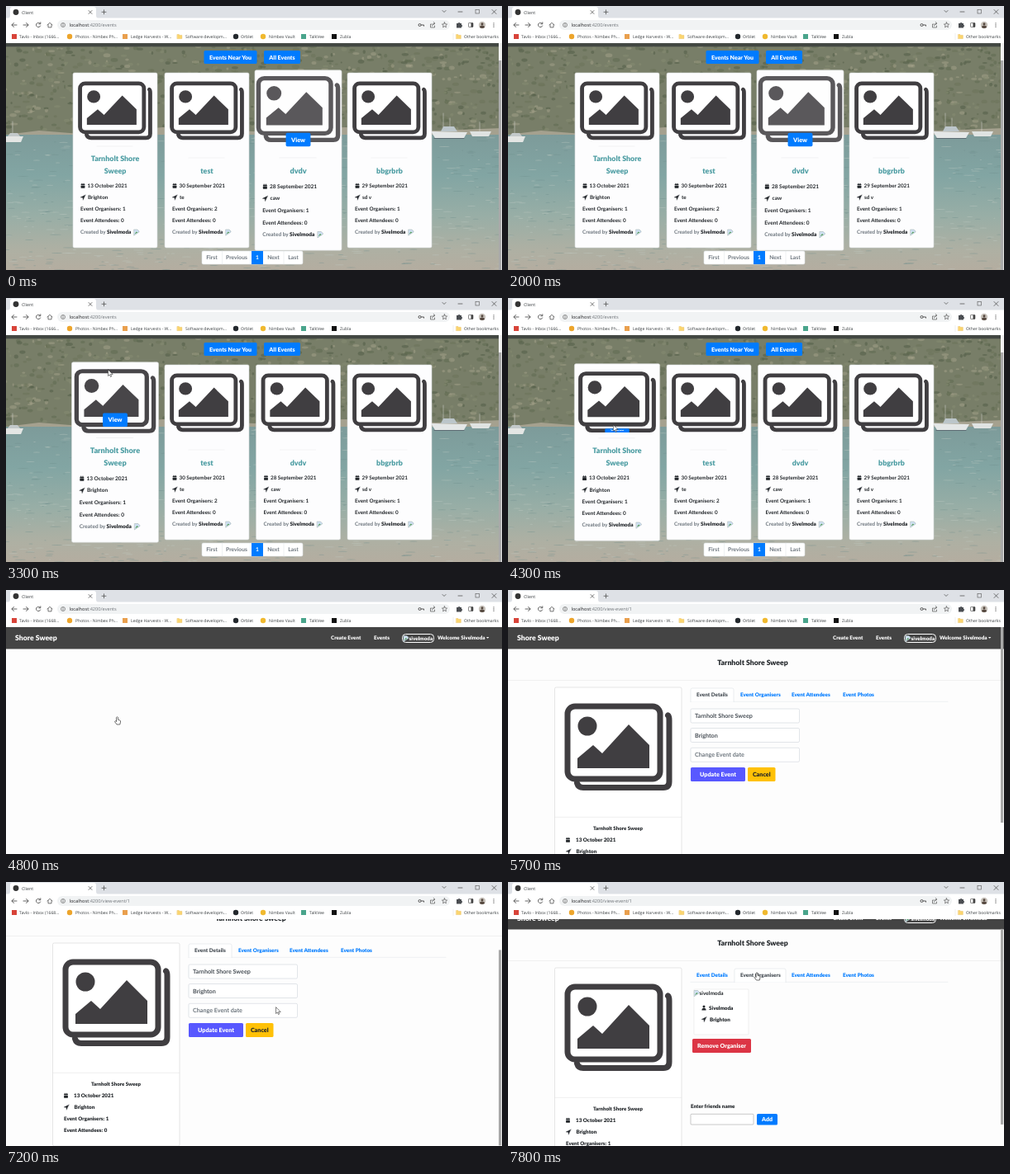
An HTML page that plays this animation: 600x320 px, repeating every 8 s.

```html
<!DOCTYPE html>
<html lang="en">
<head>
<meta charset="utf-8">
<title>Client</title>
<style>
html, body { margin: 0; width: 100%; height: 100%; overflow: hidden; background: #fff; }
svg { display: block; width: 600px; height: 320px; }
text { font-family: Lato, sans-serif; white-space: pre; text-rendering: geometricPrecision; }
.ui text { font-family: "Open Sans", sans-serif; }
</style>
</head>
<body>
<svg id="stage" viewBox="0 0 600 320" xmlns="http://www.w3.org/2000/svg"></svg>
<script>
const LOOP = 8000, STEP = 100;
const BLUE = '#007bff', INK = '#212529', GREY = '#6c757d', ICON = '#403e41';
const USER = 'Sivelmoda', EVENT = 'Tarnholt Shore Sweep';

// Markup helpers
const text = (x, y, s, size, fill = INK, weight = 900, anchor = 'start', more = '') =>
  `<text x="${x}" y="${y}" font-size="${size}" fill="${fill}" font-weight="${weight}" text-anchor="${anchor}" ${more}>${s}</text>`;
const mid = (x, y, s, size, fill, weight) => text(x, y, s, size, fill, weight, 'middle');
const rect = (x, y, w, h, fill, r = 0, stroke = 'none') =>
  `<rect x="${x}" y="${y}" width="${w}" height="${h}" rx="${r}" fill="${fill}" stroke="${stroke}" stroke-width=".6"/>`;
const disc = (x, y, r, fill) => `<circle cx="${x}" cy="${y}" r="${r}" fill="${fill}"/>`;
const path = (d, fill = 'none', stroke = 'none', w = .8) =>
  `<path d="${d}" fill="${fill}" stroke="${stroke}" stroke-width="${w}" stroke-linecap="round" stroke-linejoin="round"/>`;
const line = (d, w = .8, c = '#555') => path(d, 'none', c, w);
const at = (x, y, s) => `<g transform="translate(${x} ${y})">${s}</g>`;
const group = (id, s, more = '') => `<g id="${id}" ${more}>${s}</g>`;
const button = (x, y, w, h, s, fill = BLUE, size = 7.1, ink = '#fff') =>
  rect(x, y, w, h, fill, 1.6) + mid(x + w / 2, y + h / 2 + size * .36, s, size, ink);

// Small icons, centred on their place
const calendar = (x, y) => at(x, y, rect(-2.4, -2.2, 4.8, 1.5, INK, .5) + rect(-2.4, -.3, 4.8, 3, INK, .5)
  + line('M-1.1 -2.8v1M1.1 -2.8v1', .8, INK));
const pin = (x, y) => at(x, y, path('M3 -3L-3 0L-.2 .3L.2 3Z', INK, INK, .3));
const person = (x, y) => at(x, y, disc(0, -1.5, 1.5, INK) + path('M-2.6 2.9q0-2.7 2.6-2.7t2.6 2.7z', INK));
const broken = (x, y) => at(x, y, path('M-3 -3h4l2 2v1l-6 4z', '#cfe0f2', '#9aa', .5)
  + path('M-2.6 2.4l2.4-3l1.4 1.2z', '#4d9a4f'));
const folder = (x, y) => at(x, y, path('M-2.8 -2.4h2.2l.7.8h2.7v4.2h-5.6z', '#fbd56f', '#e3b44a', .4));
const picture = path('M124.5 14Q126 15 126 20V94Q126 101.500 119 101.500H22Q16 101.500 14.500 96', 'none', ICON, 7)
  + `<rect x="3" y="3" width="112" height="88" rx="9" fill="#fff" stroke="${ICON}" stroke-width="7"/>`
  + disc(27, 27, 11.500, ICON) + path('M15 78V66L34 50L45 60L77 25L102 50V78Z', ICON);

// Browser frame
const marks = [
  [10, 16, 'Tavlo - Inbox (1666...', '#d8443a', 0], [77, 84, 'Photos - Nimbex Ph...', '#eda52c', 1],
  [144, 151, 'Ledge Harvests - W...', '#e9a04e', 0], [278, 284, 'Orblet', '#24292e', 1],
  [311, 318, 'Nimbex Vault', '#f0b92f', 1], [360, 367, 'TalkVee', '#4aa58c', 0], [397, 404, 'Zubla', '#111', 0]
];
const bookmark = ([x, tx, s, c, round], i) =>
  (round ? disc(x, 37, 3.2, c) : rect(x - 3, 34, 6, 6, c)) +
  text(tx, 39, s, 5.1, '#3c4043', 400, 'start', i ? '' : 'id="mail"');

function browser() {
  const tab = rect(0, 0, 600, 15, '#dee1e6') + path('M2 15Q5 15 5 11V4Q5 1 8 1H106Q109 1 109 4V11Q109 15 112 15Z', '#fff')
    + disc(12, 7.500, 3.4, '#333') + text(19, 9.500, 'Client', 5.3, '#3c4043', 400)
    + line('M100 5.500l4 4m0-4l-4 4M118.500 4.800v5m-2.500-2.500h5M528 5.500l2 2 2-2M547 7h5M588 4.500l5 5m0-5l-5 5')
    + rect(568, 4.500, 4.500, 4.500, 'none', 0, '#555');
  const bar = rect(0, 14.500, 600, 30.500, '#fff') + rect(62, 17, 475, 12, '#f1f3f4', 6)
    + line('M13 23h-6m2.500-2.500l-2.500 2.500l2.500 2.500M21 23h6m-2.500-2.500l2.500 2.500l-2.500 2.500', .9)
    + line('M41.500 21.500a2.700 2.700 0 1 0 .2 2.500M41.800 19.800v2h-2', .9)
    + line('M50 23l3-2.700l3 2.700M51 22.700v3.200h4v-3.200')
    + `<circle cx="69" cy="23" r="2.5" fill="none" stroke="#666" stroke-width=".7"/>` + line('M69 22.800v1.400M69 21.600v.1', .7)
    + text(76.500, 25, 'localhost<tspan fill="#70757a">:4200<tspan id="route"></tspan></tspan>', 5.65, '#202124', 400)
    + `<circle cx="500.500" cy="23" r="1.500" fill="none" stroke="#555" stroke-width="1"/>` + line('M502.300 23h3.200v1.200', 1)
    + line('M515 22h-1.500v4h5v-2M515.500 24q0-3 3-3m-1.300-1.500l1.700 1.500l-1.700 1.500', .7)
    + line('M530.500 19.800l.9 2.100l2.200.2l-1.700 1.500l.5 2.200l-1.900-1.200l-1.900 1.200l.5-2.200l-1.700-1.500l2.200-.2z', .7)
    + path('M545 21h2a1.100 1.100 0 1 1 2.200 0h1.800v2a1.100 1.100 0 1 1 0 2.200v1.300h-6z', '#4a4d51')
    + rect(559.500, 20.500, 5.500, 5, '#fff', .6, '#444') + rect(562.500, 20.500, 2.500, 5, '#444')
    + disc(576, 23, 4.2, '#c9c4bd') + disc(576, 21.700, 1.500, '#55483f') + path('M573 25.900q0-2.500 3-2.500t3 2.500q-3 2.300-6 0', '#55483f')
    + [20.800, 23, 25.200].map(y => disc(590, y, .65, '#555')).join('');
  return tab + bar + marks.map(bookmark).join('')
    + folder(210, 37) + text(217, 39, 'Software developm...', 5.1, '#3c4043', 400)
    + line('M541 33.500v7', .5, '#ddd') + folder(547.500, 37) + text(554, 39, 'Other bookmarks', 5.1, '#3c4043', 400);
}

// Wooded bay behind the event cards
function bay() {
  let seed = 7;
  const rnd = (a, b) => (a + (b - a) * (seed = seed * 16807 % 2147483647) / 2147483647).toFixed(1);
  const blob = (x, y, rx, ry, c, o) => `<ellipse cx="${x}" cy="${y}" rx="${rx}" ry="${ry}" fill="${c}" opacity="${o}"/>`;
  const leaves = ['#525c47', '#6b7359', '#858b71', '#a09f87', '#5f6a50'];
  let s = rect(0, 45, 600, 120, '#787e68');
  for (let i = 0; i < 900; i++)
    s += blob(rnd(0, 600), rnd(48, 150), rnd(1, 4.5), rnd(1, 2.5), leaves[i % 5], .55);
  s += path('M0 156L40 151L90 155L190 147L300 152L410 147L520 151L600 148V165H0Z', '#a5a18f')
    + rect(0, 156, 600, 164, 'url(#sea)');
  for (let i = 0; i < 700; i++)
    s += blob(rnd(0, 600), rnd(159, 320), rnd(1, 7), .5, i % 2 ? '#c3cdc6' : '#6f8e8d', .4);
  return s + path('M0 158H21L18 165H0Z', '#e4e6e4') + path('M2 158l3-4h9l3 4z', '#c3c9ca') + line('M8 154V140', .5, '#d8d8d4')
    + path('M514 152L558 153L554 160H519Z', '#e4e7e7') + line('M518 160.500H554', 1, '#5c6b73')
    + path('M526 152l3-6h13l4 6z', '#bcc6ca') + line('M529 146V130M537 146v-10', .5, '#d8d8d4')
    + path('M561 152H587L584 158H564Z', '#dfe3e2') + line('M573 152v-12', .5, '#d8d8d4');
}

// Events page
const cards = [
  [81, ['Tarnholt Shore', 'Sweep'], '13 October 2021', 'Brighton', 1], [192, ['test'], '30 September 2021', 'te', 2],
  [302.500, ['dvdv'], '28 September 2021', 'caw', 1], [413, ['bbgrbrb'], '29 September 2021', 'sd v', 1]
];
const card = ([, title, date, place, count], i) => group('card' + i,
  rect(0, 0, 102, 212, '#fdfdfe', 1.8, '#d5d8d8') + group('pic' + i, picture)
  + line(`M29 ${title[1] ? 89 : 103}h43`, .5, '#e6e6e8')
  + title.map((s, k) => mid(51, 121.500 + 14.500 * (k + 1 - title.length), s, 8.9, '#4b9ca2')).join('')
  + calendar(12, 137) + text(17.500, 139, date, 6.3, INK, 700) + pin(12, 151) + text(18, 153, place, 6.3, INK, 700)
  + text(9, 167.300, 'Event Organisers: ' + count, 6.3, INK, 700) + text(9, 181.300, 'Event Attendees: 0', 6.3, INK, 700)
  + text(9, 195.200, `<tspan fill="${GREY}" font-weight="700">Created by </tspan>${USER}`, 6.3) + broken(77, 193)
  + group('view' + i, button(-14.500, -8, 29, 16, 'View')));

const pager = rect(237, 297, 122, 16, '#fff', 1.8, '#dee2e6') + line('M261.500 297v16M336 297v16', .5, '#dee2e6') + rect(297, 297, 14, 16, BLUE)
  + [[249, 'First'], [279, 'Previous'], [304, '1', '#fff'], [323.500, 'Next'], [347.500, 'Last']]
    .map(([x, s, c = GREY]) => mid(x, 307.300, s, 6.7, c, 700)).join('');
const eventsPage = bay() + rect(0, 45, 600, 4.300, '#434843') + rect(596, 45, 4, 275, '#f1f1f1')
  + button(239.500, 54, 64, 16, 'Events Near You', BLUE, 7) + button(312, 54, 44, 16, 'All Events', BLUE, 7)
  + cards.map(card).join('') + pager;

// Single event page
const nav = rect(0, 45, 600, 26.500, '#444') + text(11, 61, 'Shore Sweep', 8.7, '#fff')
  + text(393, 60.300, 'Create Event', 6.3, '#fff') + text(445, 60.300, 'Events', 6.3, '#fff')
  + `<rect x="479.500" y="53.500" width="38" height="10" rx="4" fill="none" stroke="#fff"/>` + broken(484, 58.500)
  + text(487.500, 60.500, USER.toLowerCase(), 6.3, '#fff') + text(522, 60.300, 'Welcome ' + USER, 6.3, '#fff')
  + path('M581 57h3.400l-1.700 1.800z', '#fff');
const tabs = [[221, 52, 'Details'], [274, 62, 'Organisers'], [336, 62, 'Attendees'], [398, 52, 'Photos']];
const tabBar = active => line('M221 135.300H532', .5, '#dee2e6') + tabs.map(([x, w, s], i) =>
  (i == active ? path(`M${x} 135.500V121q0-2 2-2h${w - 4}q2 0 2 2V135.500`, '#fff', '#dee2e6', .6) : '')
  + text(x + 7, 129, 'Event ' + s, 6.35, i == active ? '#495057' : BLUE)).join('');
const field = (y, s, c = '#495057') => rect(221, y, 131.500, 17, '#fff', 1.600, '#ced4da') + text(226, y + 11, s, 7.2, c, 700);
const details = tabBar(0) + field(144, EVENT) + field(167.500, 'Brighton') + field(191.300, 'Change Event date', GREY)
  + button(221, 215, 66, 17, 'Update Event', '#5858ff', 7.2) + button(290, 215, 33.500, 17, 'Cancel', '#ffc107', 7.2, INK);
const organisers = tabBar(1) + rect(225, 144, 66, 55, '#fff', 1, '#e6e6e6') + broken(228.500, 148.500)
  + text(231.500, 151, USER.toLowerCase(), 6.5, INK, 700) + person(237, 166.500) + text(243, 169, USER, 6.3)
  + pin(237, 180.500) + text(244, 183, 'Brighton', 6.3)
  + button(223, 204, 71, 17, 'Remove Organiser', '#dc3545', 7.1)
  + text(221, 288.300, 'Enter friends name', 6.3) + rect(221, 295.300, 76, 12.700, '#fff', 1, '#a5a5a5')
  + button(301, 295, 25, 13.500, 'Add', BLUE, 7);
const summary = mid(296, 91, EVENT, 8.7) + line('M0 109.500H600', .5, '#e2e2e2')
  + rect(56.500, 118, 153.500, 246, '#fff', 1.800, '#d3d3d3') + at(69, 138, picture) + line('M57 275.300H209.500', .5, '#ddd')
  + mid(133, 291, EVENT, 6.1) + calendar(72.500, 303) + text(82, 305, '13 October 2021', 6.3)
  + pin(73, 317) + text(82.500, 319, 'Brighton', 6.3)
  + text(70, 333, 'Event Organisers: 1', 6.2) + text(70, 347, 'Event Attendees: 0', 6.2);
const eventPage = nav + group('loaded', summary + group('details', details) + group('organisers', organisers));

const arrow = path('M0 0V7.500L1.800 5.900L3 8.600L4.200 8L3 5.500H5.300Z', '#fff', '#333', .6);
const hand = path('M-1 1V-3.500Q0 -5 1 -3.500V-.8L3.300 0Q4.300 .4 4 2L3.300 5H-.5L-3 1.600Q-2.600 .2 -1 1Z', '#fff', '#333', .7);

const stage = document.getElementById('stage');
stage.innerHTML = `<defs><clipPath id="port"><rect y="45" width="600" height="275"/></clipPath>
  <linearGradient id="sea" x2="0" y2="1"><stop stop-color="#7d9b9a"/><stop offset=".3" stop-color="#82a5a3"/>
  <stop offset=".6" stop-color="#98aea6"/><stop offset=".85" stop-color="#aeb0a3"/><stop offset="1" stop-color="#b4ada0"/></linearGradient></defs>`
  + rect(0, 0, 600, 320, '#fdfdfd')
  + `<g clip-path="url(#port)">${group('events', eventsPage)}${group('event', eventPage)}${group('thumb', rect(596, 0, 3.200, 1, '#a9a9a9'))}</g>`
  + group('chrome', browser(), 'class="ui"') + group('arrow', arrow) + group('hand', hand);

const el = {};
stage.querySelectorAll('[id]').forEach(n => el[n.id] = n);
const show = (id, on) => el[id].style.display = on ? '' : 'none';
const move = (id, s) => el[id].setAttribute('transform', s);

// Linear value between [time, value] points
function key(t, pts) {
  if (t <= pts[0][0]) return pts[0][1];
  for (let i = 1; i < pts.length; i++) {
    const [a, u] = pts[i - 1], [b, v] = pts[i];
    if (t < b) return u + (v - u) * (t - a) / (b - a);
  }
  return pts[pts.length - 1][1];
}

function hover(i, grow, zoom, fold) {
  const size = 1 + .1 * zoom;
  move('card' + i, `translate(${cards[i][0] + 51} 187) scale(${1 + .03 * grow}) translate(-51 -106)`);
  move('pic' + i, `translate(51 46) scale(${.69 * size} ${.67 * size}) translate(-64.500 -52.500)`);
  el['pic' + i].setAttribute('opacity', 1 - .14 * Math.max(0, zoom * 2 - 1));
  move('view' + i, `translate(51 ${fold < 1 ? 80 : 40 + 41.700 * zoom}) scale(1 ${fold})`);
  show('view' + i, zoom > .1 && fold > 0);
}

function draw(time) {
  const t = Math.floor(time / STEP) * STEP;
  const onEvents = t < 4600, loaded = t >= 5000, second = t >= 7600;
  const fade = key(t, [[2500, 1], [2800, 0]]);
  hover(0, key(t, [[3000, 0], [3200, 1], [4100, 1], [4300, .4], [4500, 0]]),
    key(t, [[2900, 0], [3300, .67], [3500, 1], [4100, 1], [4300, .33], [4500, 0]]), key(t, [[4100, 1], [4300, .3], [4400, 0]]));
  hover(1, 0, 0, 1);
  hover(2, fade, fade, 1);
  hover(3, 0, 0, 1);

  show('events', onEvents);
  show('event', !onEvents);
  show('loaded', loaded);
  show('details', !second);
  show('organisers', second);
  el.route.textContent = loaded ? '/view-event/1' : '/events';
  el.mail.textContent = `Tavlo - Inbox (${onEvents ? 1666 : 1668}...`;

  const scroll = key(t, [[5900, 0], [6200, 44], [7300, 44], [7500, 14]]);
  move('event', `translate(0 ${-scroll})`);
  show('thumb', onEvents || loaded);
  move('thumb', onEvents ? 'translate(0 66) scale(1 254)' : `translate(0 ${45 + scroll * .85}) scale(1 237)`);

  const x = key(t, [[2500, 346], [2900, 235], [3300, 123.500], [4200, 125], [4600, 134.500], [6900, 134.500], [7000, 352], [7400, 301]]);
  const y = key(t, [[2500, 108], [2700, 72], [3000, 70], [3300, 87], [3500, 92], [4000, 152], [4300, 154], [4600, 158], [6900, 158], [7000, 190], [7400, 114]]);
  const inView = t >= 2500 && t < 5500 || t >= 7000;
  const pointing = t >= 4400 && t < 5300 || t >= 7400;
  show('arrow', inView && !pointing);
  show('hand', inView && pointing);
  move('arrow', `translate(${x} ${y})`);
  move('hand', `translate(${x} ${y})`);
}

const start = performance.now();
(function tick() {
  draw((performance.now() - start) % LOOP);
  requestAnimationFrame(tick);
})();
</script>
</body>
</html>
```
